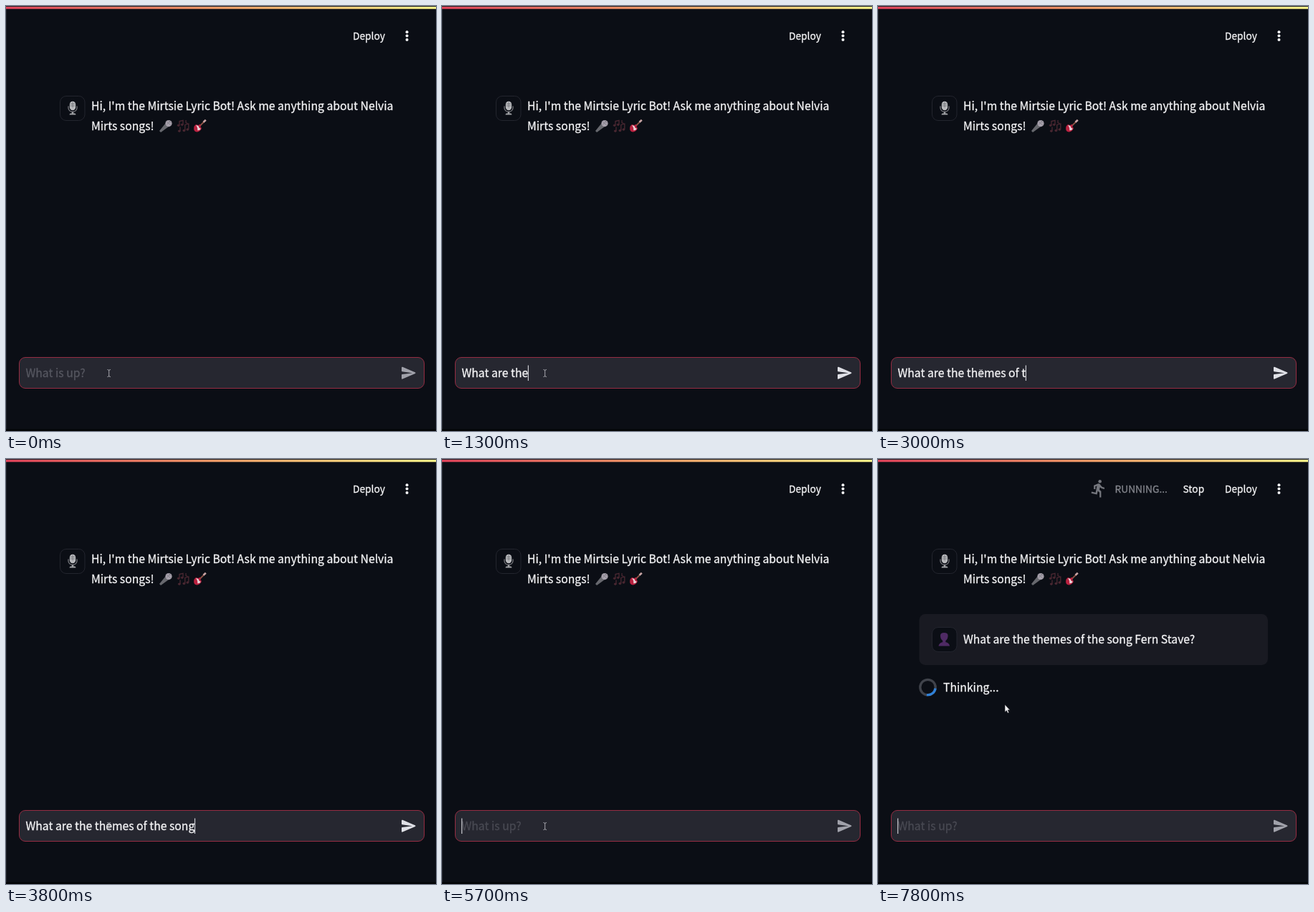
Animation, 600 px wide and 592 px high, one loop 8 s. Source, as an HTML page:

```html
<!DOCTYPE html>
<html lang="en">
<head>
<meta charset="utf-8">
<title>Lyric chat</title>
<style>
  html, body { margin: 0; width: 100%; height: 100%; overflow: hidden; background: #0b0e15; }
  svg { display: block; width: 600px; height: 592px; }
  text {
    font: 15.74px "Noto Sans CJK JP", "Noto Sans CJK SC", "Noto Sans CJK", "Open Sans", sans-serif;
    fill: currentColor;
    stroke: currentColor;
    stroke-width: .28px;
    color: #f6f6f8;
    white-space: pre;
  }
  .small { font-size: 13.75px; }
  .avatar { fill: #0b0e15; stroke: #23252e; }
</style>
</head>
<body>
<svg viewBox="0 0 600 592">
  <defs>
    <linearGradient id="bar">
      <stop offset="0" stop-color="#dc4259"/>
      <stop offset=".5" stop-color="#eb9b66"/>
      <stop offset="1" stop-color="#f6ee87"/>
    </linearGradient>
  </defs>

  <rect width="600" height="592" fill="#0b0e15"/>
  <rect width="1" height="592" fill="#1d2027"/>
  <rect width="600" height="1" fill="#24262c"/>
  <rect y="1" width="600" height="3.2" fill="url(#bar)"/>
  <rect y="589.5" width="600" height="2.5" fill="#030406"/>

  <!-- header -->
  <text class="small" x="484" y="46.5">Deploy</text>
  <g fill="#f6f6f8">
    <circle cx="559.5" cy="36.3" r="2"/>
    <circle cx="559.5" cy="41.6" r="2"/>
    <circle cx="559.5" cy="46.9" r="2"/>
  </g>
  <g id="status">
    <g id="swim" transform="translate(292.6 26.4) scale(1.23)" fill="#74767d">
      <circle cx="16.5" cy="5.5" r="2.5"/>
      <path d="M10 8L6.7 11.3Q8.5 12.8 10 11.5Q12 10.4 14 11.5Q15.3 12.4 17 11.5L10.5 5Q8.3 2.9 5 3V5.5Q7.5 5.5 9 7z"/>
      <path d="M2 15.2q1.7 0 3.3 -1t3.3 0t3.4 0t3.4 0t3.3 0t3.3 1M2 19.8q1.7 0 3.3 -1t3.3 0t3.4 0t3.4 0t3.3 0t3.3 1" fill="none" stroke="#74767d" stroke-width="1.9"/>
    </g>
    <g id="run" transform="translate(294.3 27.3) scale(1.14)" fill="#74767d">
      <circle cx="13.5" cy="3.5" r="2"/>
      <path d="M9.9 19.4l1 -4.4l2.1 2v6h2v-7.5l-2.1 -2l.6 -3q2.1 2.5 5.5 2.5v-2q-2.8 0 -4.3 -2.4l-1 -1.6q-.9 -1.2 -2.5 -.9L6 8.3V13h2V9.6l1.8 -.7L8.2 17l-4.9 -1l-.4 2z"/>
    </g>
    <text class="small" x="330.5" y="46.5" style="color:#85878e">RUNNING...</text>
    <text class="small" x="425.5" y="46.5">Stop</text>
  </g>

  <!-- greeting -->
  <rect class="avatar" x="75.5" y="125.5" width="34.5" height="34" rx="8.5"/>
  <g>
    <rect x="88.8" y="132.8" width="8.4" height="12.4" rx="4.2" fill="#b9babd"/>
    <path d="M89.5 136.3h7M89.5 139h7M93 133.5v8" stroke="#6d6f74" stroke-width=".8"/>
    <path d="M87 139.5v2.5a6 5.5 0 0 0 12 0v-2.5" fill="none" stroke="#77787d" stroke-width="1.3"/>
    <path d="M93 147.5v2.5" stroke="#9b9ca0" stroke-width="2.4"/>
    <path d="M88.5 151.5q0 -2 2 -2h5q2 0 2 2z" fill="#a2a3a7"/>
  </g>
  <text x="119" y="145">Hi, I'm the Mirtsie Lyric Bot! Ask me anything about Nelvia</text>
  <text x="119" y="173">Mirts songs!</text>
  <g>
    <path d="M222.5 163.5L227 168L216 176L214 174z" fill="#67686e"/>
    <path d="M222.5 163.5L227.5 168.5" stroke="#3b3c42" stroke-width="1.6"/>
    <circle cx="227" cy="163.5" r="4.6" fill="#a9a3ae"/>
    <path d="M224 161l6 5M226.5 159.5l4 3.5M224 165.5l5.5 -5.5" stroke="#75717c" stroke-width=".7"/>
  </g>
  <g fill="#4b2832" stroke="#4b2832">
    <path d="M242 166V160.5L247 159.3V165M249.8 173V165.5L254.8 164V171.5M243 174V168.5" fill="none" stroke-width="1.3"/>
    <ellipse cx="240.7" cy="166.3" rx="1.5" ry="1.1"/>
    <ellipse cx="245.7" cy="165.3" rx="1.5" ry="1.1"/>
    <ellipse cx="248.4" cy="173.5" rx="1.5" ry="1.2"/>
    <ellipse cx="253.4" cy="172" rx="1.5" ry="1.2"/>
    <ellipse cx="241.8" cy="174.2" rx="1.5" ry="1.1"/>
    <path d="M251 159v3.5l2.5 1" fill="none" stroke-width="1.2"/>
  </g>
  <g>
    <path d="M270 167.5L276.5 161" stroke="#8b5348" stroke-width="1.8"/>
    <path d="M275.5 161.8L278.8 158.7" stroke="#c9a5a5" stroke-width="2.6"/>
    <path d="M264.2 165.4q2.8 -.8 3.8 1q2 -2 3.3 -1q1 1.4 -.2 2.8q2.6 1.4 1 3.8q-2.3 3.4 -5.8 3.4q-4.4 -.4 -4.2 -4.6q.2 -4 2.1 -5.4z" fill="#b9213f"/>
    <path d="M265 166.3q3.8 -.5 4.3 3.2l2.5 1.5q-1.6 2.6 -4.6 2.2q.6 -4 -2.2 -6.9z" fill="#ead5da"/>
  </g>

  <!-- question and answer -->
  <g id="chat">
    <rect x="57.5" y="216" width="486.5" height="71" rx="8.5" fill="#191a22"/>
    <rect class="avatar" x="75.5" y="234.5" width="34.5" height="34" rx="8.5"/>
    <g fill="#4f2a64">
      <path d="M87 246q0 -4 5.3 -4t5.3 4q0 5 -3.2 7v3h-4.2v-3q-3.2 -2 -3.2 -7z"/>
      <path d="M84.5 260.5q.6 -4 5 -5.2h5.6q4.4 1.2 5 5.2z"/>
    </g>
    <text x="119" y="257" id="question"></text>
  </g>
  <g id="thinking">
    <g fill="none" stroke-width="3.3">
      <circle cx="69.5" cy="318" r="10.7" stroke="#40434b"/>
      <path id="arc" d="M80.2 318A10.7 10.7 0 0 1 69.5 328.7" stroke="#2f80d8"/>
    </g>
    <text x="91" y="324">Thinking...</text>
  </g>

  <!-- input -->
  <rect x="18.5" y="489.5" width="565" height="43" rx="8.5" fill="#262730" stroke="#952c42"/>
  <text id="hint" x="27.5" y="517">What is up?</text>
  <text id="typed" x="27.5" y="517"></text>
  <rect id="caret" y="500.5" width="1.2" height="21.5" fill="#c9cad0"/>
  <path id="send" transform="translate(550 499.2)" d="M3.4 20.4L20.85 12.9a1 1 0 0 0 0 -1.8L3.4 3.6Q2 3.2 2 4.5V9.1q0 .9 .9 1L17 12L2.9 13.9q-.9 .1 -.9 1V19.5q0 1.3 1.4 .9z"/>

  <!-- pointers -->
  <path id="beam" d="M141.5 506.5q2.2 0 2.2 1.5q0 -1.5 2.2 -1.5M143.7 508V515M141.5 516.5q2.2 0 2.2 -1.5q0 1.5 2.2 1.5" fill="none" stroke="#a5a6ac" stroke-width="1"/>
  <path id="arrow" d="M0 0V10.5L2.4 8.4L4 12L5.8 11.2L4.2 7.8H7.2z" fill="#f4f4f6" stroke="#15171c" stroke-width=".6"/>
</svg>
<script>
  const LOOP = 8000, STEP = 100;
  const PROMPT = "What are the themes of the song Fern Stave?";
  const SENT = 5700, POSTED = 6000, RESUME = 7300;
  const pace = [[0, 0], [700, 7], [1900, 17], [3000, 24], [4700, 39], [5300, 43]];
  const $ = id => document.getElementById(id);
  const show = (id, on) => { $(id).style.display = on ? "" : "none"; };

  // piecewise linear value at time t
  function track(points, t) {
    for (let i = 1; i < points.length; i++) {
      const [t0, v0] = points[i - 1], [t1, v1] = points[i];
      if (t <= t1) return v0 + (v1 - v0) * Math.max(0, t - t0) / (t1 - t0);
    }
    return points[points.length - 1][1];
  }

  function drawInput(t) {
    const count = t < SENT ? Math.floor(track(pace, t) + 1e-6) : 0;
    const typed = $("typed");
    typed.textContent = PROMPT.slice(0, count);
    const width = count ? typed.getComputedTextLength() : 0;
    $("caret").setAttribute("x", 27.1 + width);
    show("caret", t >= STEP && !(t >= 6800 && t < RESUME));
    show("hint", !count);
    $("hint").style.color = t < SENT ? "#565760" : "#494a53";
    $("send").setAttribute("fill", count ? "#dfe0e6" : "#a0a1aa");
  }

  function drawReply(t) {
    show("chat", t >= POSTED);
    show("status", t >= POSTED);
    show("thinking", t >= POSTED + STEP);
    show("swim", t < RESUME);
    show("run", t >= RESUME);
    // the spinner stalls before and after the resume
    const spin = t < RESUME ? Math.min(t, 7000) : Math.min(t, 7500);
    $("arc").setAttribute("transform", `rotate(${(spin - 6400) / 1100 * 360 + 8} 69.5 318)`);
  }

  function drawPointer(t) {
    show("beam", t < POSTED);
    show("arrow", t >= RESUME);
    const x = track([[RESUME, 168], [7500, 177]], t);
    const y = track([[RESUME, 385], [7500, 342]], t);
    $("arrow").setAttribute("transform", `translate(${x} ${y})`);
  }

  function frame(now) {
    const t = Math.floor(now % LOOP / STEP) * STEP;
    drawInput(t);
    drawReply(t);
    drawPointer(t);
  }

  $("question").textContent = PROMPT;
  const start = performance.now();
  function tick() {
    frame(performance.now() - start);
    requestAnimationFrame(tick);
  }
  tick();
</script>
</body>
</html>
```
